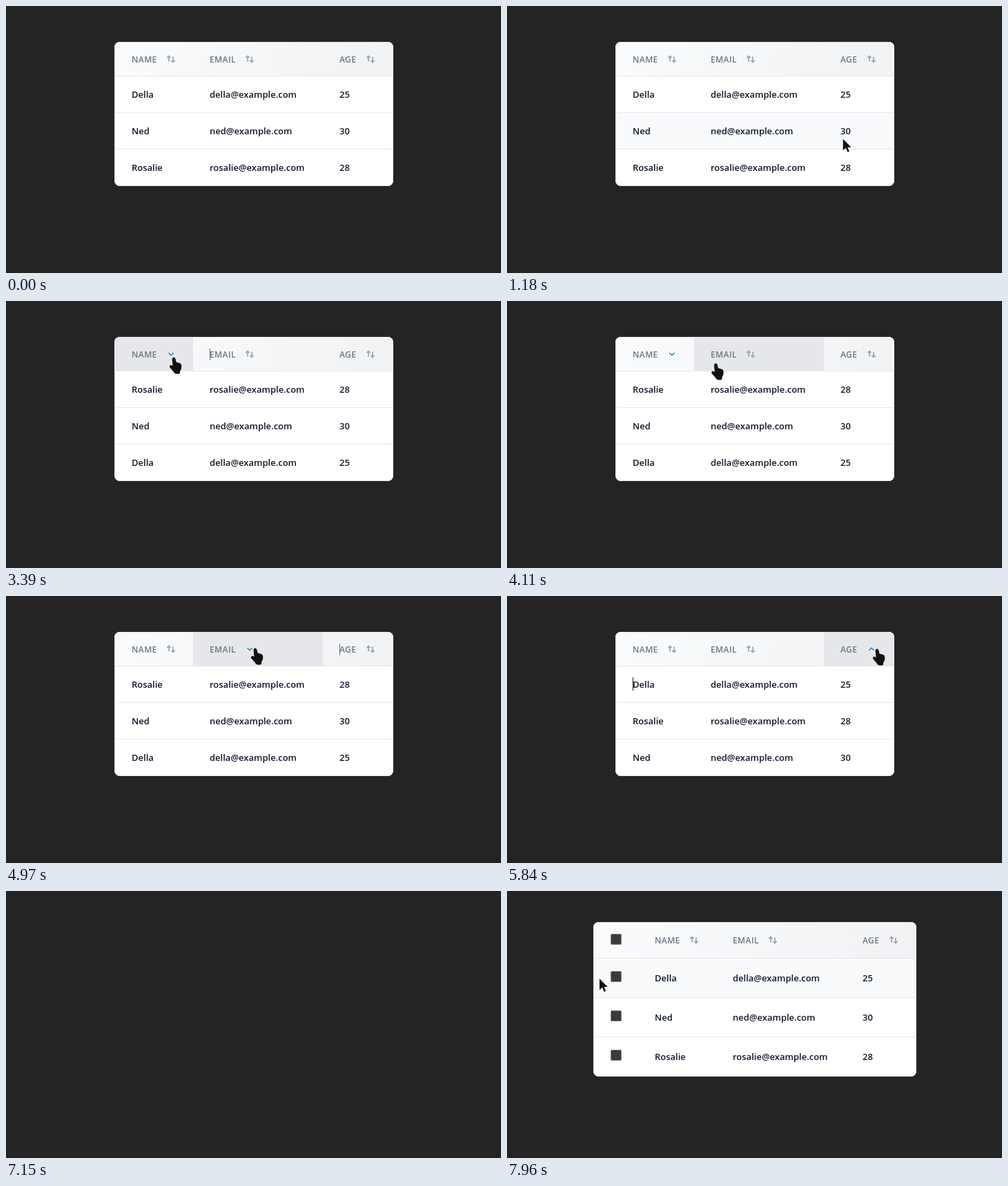
These frames come from a looping animation (717 px wide and 387 px high, 8000 ms). An HTML page with a canvas:

```html
<!DOCTYPE html>
<html lang="en">
<head>
<meta charset="utf-8">
<title>Sortable table</title>
<style>
  html, body { margin: 0; width: 100%; height: 100%; overflow: hidden; background: #242424; }
  canvas { display: block; }
</style>
</head>
<body>
<canvas width="717" height="387"></canvas>
<script>
const ctx = document.querySelector('canvas').getContext('2d');
const LOOP = 8000, BLINK = 530;
const people = [['Della', 25], ['Ned', 30], ['Rosalie', 28]]
  .map(([name, age]) => [name, name.toLowerCase() + '@example.com', age]);

const tables = {
  plain: { x: 157, y: 52, w: 404, h: 209, head: 49, row: 53, cols: [182, 295, 483], cells: [157, 271, 459, 561] },
  select: { x: 125, y: 45, w: 468, h: 224, head: 52, row: 57, cols: [214, 327, 515], cells: [189, 303, 491, 593], boxes: 150 }
};
const iconOffset = [57, 58, 45];

// time of press, column, direction, resulting row order
const clicks = [
  { at: 2120, col: 0, dir: -1, order: [0, 1, 2] },
  { at: 2990, col: 0, dir: 1, order: [2, 1, 0] },
  { at: 4500, col: 1, dir: -1, order: [0, 1, 2] },
  { at: 4830, col: 1, dir: 1, order: [2, 1, 0] },
  { at: 5590, col: 2, dir: -1, order: [0, 2, 1] },
  { at: 6140, col: 2, dir: 1, order: [1, 2, 0] }
];
const RELEASE = 80;
const HEAD_TEXT = '#6b7580', ROW_TEXT = '#0f172a';
const carets = [[295, 69, 17, HEAD_TEXT], [483, 69, 17, HEAD_TEXT], [182, 118, 19, ROW_TEXT]];

// time, x, y of the pointer tip
const path = [
  [390, 640, 386], [1180, 487, 193], [2020, 242, 69.5], [2300, 242, 69.5], [2560, 246, 98],
  [2820, 243, 79], [3250, 243, 79], [3390, 243, 82], [3750, 243, 83], [4050, 290, 94],
  [4400, 361, 76], [5170, 361, 76], [5520, 536, 77], [6240, 536, 77], [6400, 32, 120],
  [7190, 69, 215], [7910, 127, 140], [7960, 134, 127]
];
const arrow = new Path2D('M0 0V16.5L4 12.8 6.6 19 9.2 18 6.6 12H11.8Z');
const hand = new Path2D('M-2.5 2Q-2-.5 0-.5T2.5 2L3.5 6.5 8.5 8Q11 8.5 11.3 12L11 16 9 20V23Q5 24.5 1.5 23L-2 18.5-6 14Q-6.5 10.5-3.5 11L-1.5 12Z');
const sortIcon = new Path2D('M-3 3.5V-4M-5.7-1.8L-3-4.5-.3-1.8M3-3.5V4M.3 1.8L3 4.5 5.7 1.8');
const chevron = new Path2D('M-3.5-1.7L0 1.7 3.5-1.7');

function pointerAt(t) {
  if (t < path[0][0] || (t > 6400 && t < 7190)) return null;
  const i = path.findIndex(p => p[0] > t);
  if (i < 0) return path[path.length - 1].slice(1);
  const [t0, x0, y0] = path[i - 1], [t1, x1, y1] = path[i];
  const k = (t - t0) / (t1 - t0);
  return [x0 + (x1 - x0) * k, y0 + (y1 - y0) * k];
}

function rect(color, x, y, w, h) {
  ctx.fillStyle = color;
  ctx.fillRect(x, y, w, h);
}

function shape(path2d, x, y, color, { line = 0, flip = 1 } = {}) {
  ctx.save();
  ctx.translate(x, y);
  ctx.scale(1, flip);
  ctx.lineWidth = line;
  ctx.fillStyle = ctx.strokeStyle = color;
  line ? ctx.stroke(path2d) : ctx.fill(path2d);
  ctx.restore();
}

function text(value, x, y, color, font, spacing = 0) {
  ctx.font = `600 ${font}px "Open Sans", "Noto Sans", sans-serif`;
  ctx.letterSpacing = spacing + 'px';
  ctx.fillStyle = color;
  ctx.fillText(value, x, y);
}

function checkbox(x, y) {
  ctx.beginPath();
  ctx.roundRect(x + .5, y + .5, 15, 15, 1.5);
  ctx.fillStyle = '#3b3b3b';
  ctx.strokeStyle = '#858585';
  ctx.lineWidth = 1;
  ctx.fill();
  ctx.stroke();
}

function drawTable(table, order, sorted, pointer, textAlpha) {
  const { x, y, w, h, head, row, cols, cells, boxes } = table;
  const [px, py] = pointer || [-1, -1];
  const over = px >= x && px < x + w;
  const inHead = over && py >= y && py < y + head;

  ctx.save();
  ctx.beginPath();
  ctx.roundRect(x, y, w, h, 8);
  ctx.clip();
  rect('#fff', x, y, w, h);
  const fade = ctx.createLinearGradient(x, y, x + w, y + head);
  fade.addColorStop(0, '#f9fbfc');
  fade.addColorStop(1, '#f1f2f4');
  rect(fade, x, y, w, head);

  ['NAME', 'EMAIL', 'AGE'].forEach((label, i) => {
    if (inHead && px >= cells[i] && px < cells[i + 1])
      rect('#e5e7eb', cells[i], y, cells[i + 1] - cells[i], head);
    const mid = y + (boxes ? 26 : 25), iconX = cols[i] + iconOffset[i];
    text(label, cols[i], mid + 4.5, HEAD_TEXT, 12, .4);
    if (sorted && sorted.col === i)
      shape(chevron, iconX, mid, '#1686d0', { line: 1.6, flip: sorted.dir });
    else
      shape(sortIcon, iconX, mid, '#a1a9b0', { line: 1.8 });
  });
  if (boxes) checkbox(boxes, y + 17);

  order.forEach((id, i) => {
    const top = y + head + i * row;
    if (over && py > top && py <= top + row) rect('#f8fafc', x, top, w, row);
    rect('#e5e7eb', x, top, w, 1);
    ctx.globalAlpha = textAlpha;
    people[id].forEach((value, c) =>
      text(value, cols[c], top + (boxes ? 34 : 32), ROW_TEXT, 13));
    ctx.globalAlpha = 1;
    if (boxes) checkbox(boxes, top + 19);
  });
  ctx.restore();

  ctx.beginPath();
  ctx.roundRect(x + .5, y + .5, w - 1, h - 1, 7.5);
  ctx.lineWidth = 1;
  ctx.strokeStyle = '#e5e7eb';
  ctx.stroke();
  return inHead;
}

function draw(t) {
  rect('#242424', 0, 0, 717, 387);
  if (t >= 7150 && t < 7190) return;

  const pointer = pointerAt(t);
  const first = t < 7150;
  const done = first ? clicks.filter(c => c.at + RELEASE <= t).pop() : null;
  const overHead = drawTable(first ? tables.plain : tables.select,
    done ? done.order : [0, 1, 2], done, pointer, first && t >= 6950 ? .75 : 1);

  const since = t - (done ? done.at + RELEASE : 390);
  if (first && since >= 0 && Math.floor(since / BLINK) % 2 === 0) {
    const [x, y, h, color] = carets[done ? done.col : 2];
    rect(color, x, y, 1, h);
  }

  if (!pointer) return;
  const [x, y] = pointer;
  shape(overHead ? hand : arrow, x, y, '#111');
  if (clicks.some(c => t >= c.at - 10 && t < c.at + 130)) {
    ctx.fillStyle = 'rgba(250, 248, 30, .55)';
    ctx.beginPath();
    ctx.arc(x, y, 12, 0, 7);
    ctx.fill();
  }
}

function tick() {
  draw(performance.now() % LOOP);
  requestAnimationFrame(tick);
}
tick();
</script>
</body>
</html>
```
